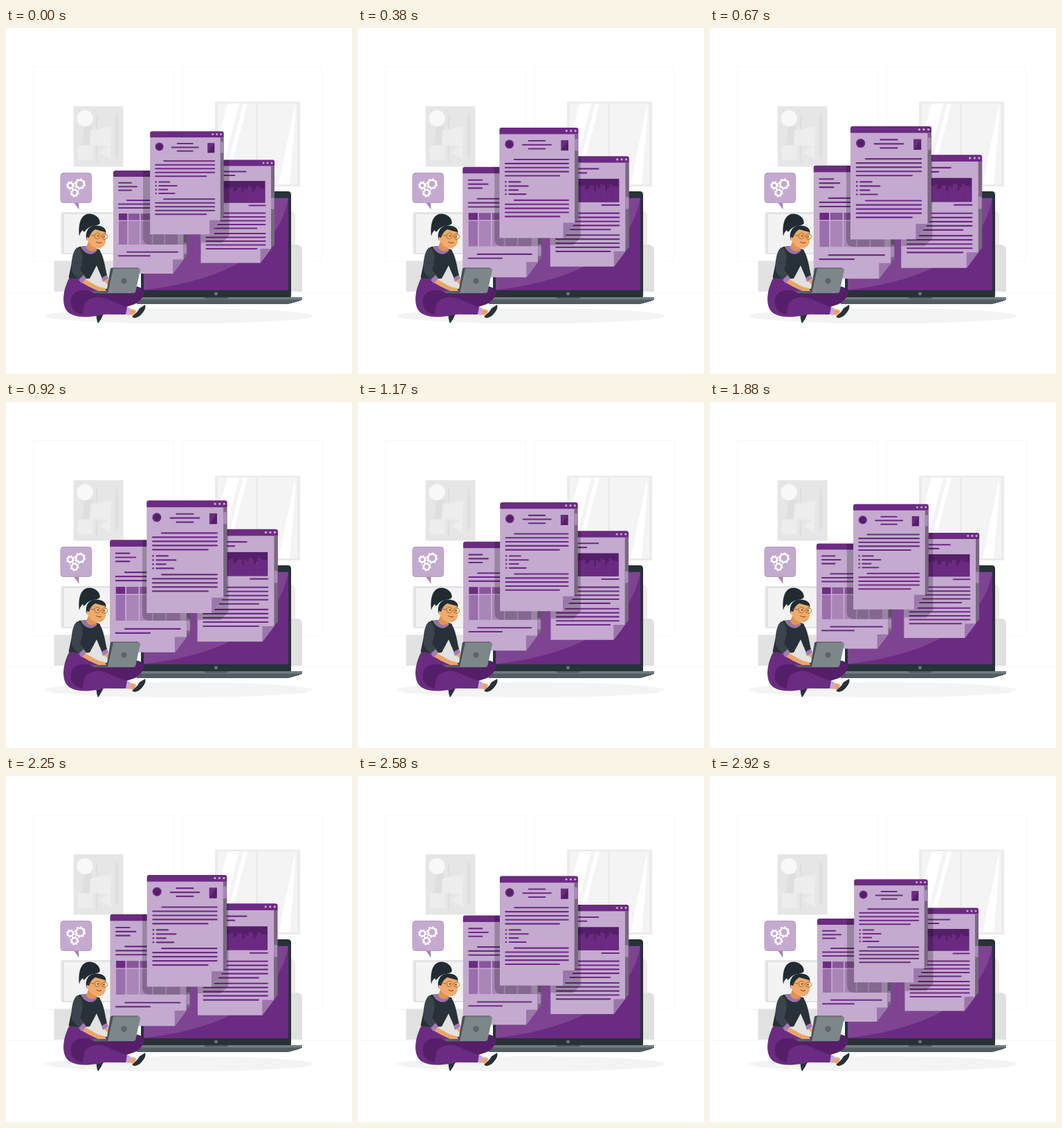
Write an HTML page that moves like this. It is 500 px wide and 500 px high and loops after 3 s.

```html
<!DOCTYPE html>
<html lang="en">
<head>
<meta charset="utf-8">
<title>Documents</title>
<style>
html, body { margin: 0; width: 100%; height: 100%; overflow: hidden; background: #fff; }
svg { display: block; width: 100vw; height: 100vh; }
</style>
</head>
<body>
<svg viewBox="0 0 500 500">
  <defs>
    <clipPath id="sheet"><path d="M0 3Q0 0 3 0H103.500Q106.500 0 106.500 3V123L101.500 128.500L86 149H0Z"/></clipPath>
    <clipPath id="pane"><path d="M306 109H421V226H306Z"/></clipPath>
  </defs>

  <!-- room -->
  <path d="M39.500 55.500H242.500V337.500H39.500ZM255.500 55.500H458V337.500H255.500ZM0 382.500H500" fill="none" stroke="#f8f8f8"/>
  <path d="M97.500 113H169.500V200.500H97.500Z" fill="#e6e6e6"/>
  <path d="M113 141H125L121 169H110ZM130 125H132.500V194H130ZM158 125H162V186H158Z" fill="#dfdfdf"/>
  <path d="M122 148L153 141.500L151 171L121 169ZM104 170H126V191H104ZM135 179L150 169L152 190Z" fill="#ededed"/>
  <circle cx="114" cy="130.500" r="11.700" fill="#f8f8f8"/>
  <path d="M302 106.500H425V229H302Z" fill="#ebebeb"/>
  <path d="M306 109H421V226H306Z" fill="#f4f4f4"/>
  <g clip-path="url(#pane)" fill="#fff">
    <path d="M320 109H337L307 226H290ZM343 109H349L319 226H313ZM418 109V128L410 226H394Z"/>
    <path d="M361 109H364V226H361Z" fill="#ebebeb"/>
  </g>
  <rect x="79.500" y="266" width="90" height="61" rx="3" fill="#e3e3e3"/>
  <rect x="84" y="269" width="85" height="56" rx="2" fill="#f3f3f3"/>
  <path d="M69.500 336.500H180V381H69.500Z" fill="#e2e2e2"/>
  <rect x="360" y="264" width="58" height="90" rx="7" fill="#ebebeb"/>
  <path d="M390 313H420Q428 313 428 322V381H390Z" fill="#e0e0e0"/>
  <ellipse cx="249.500" cy="416" rx="193.500" ry="11" fill="#f4f4f4"/>

  <!-- large laptop -->
  <rect x="195" y="236" width="217" height="156" rx="4.500" fill="#263238"/>
  <rect x="199" y="245.500" width="209" height="133.500" rx="1.500" fill="#6c2b82"/>
  <path d="M199 246H408Q388 354 205 378H199Z" fill="#7e4492"/>
  <circle cx="303.500" cy="384" r="2.500" fill="#66727a"/>
  <path d="M180 389H428V393H180Z" fill="#727d82"/>
  <path d="M180 392.500H428Q427 394 408 399H190Z" fill="#515d63"/>
  <path d="M286 389H321.500L319 391.500H288Z" fill="#525c61"/>

  <g id="docs"></g>

  <!-- speech bubble -->
  <path d="M97 251L105.500 262.500L105 251Z" fill="#a487b1"/>
  <rect x="79" y="209.500" width="44.500" height="43" rx="4" fill="#c4aacf" stroke="#b79bc3"/>
  <g id="gears" fill="none" stroke="#fff"></g>

  <!-- legs -->
  <path d="M143 404L154 407L149 412L139 410Z" fill="#eca465"/>
  <path d="M130.500 408Q137 410 143 406Q140 418 133 427Q130 421 130.500 408Z" fill="#263238"/>
  <path d="M130 378L180 374Q194 371 199 380Q202 389 186 399L165 406L110 400Z" fill="#541f68"/>
  <path d="M92 360C81 380 79 405 93 413C107 421 130 417 152 412L174 414L176 404C160 401 143 388 128 377L113 362Z" fill="#6c2b82"/>
  <path d="M94 400C92 384 102 376 122 380L150 384L160 400C146 398 132 396 117 400Q110 403 111 414Q97 412 94 400Z" fill="#541f68"/>
  <path d="M113 399C122 386 140 386 153 395L176 404L174 414Q140 414 124 413Q111 409 113 399Z" fill="#6c2b82"/>
  <path d="M175 403L180 405L178 415L173 414Z" fill="#c4aacf"/>
  <path d="M180 406L188 408L186 416L178 414Z" fill="#eca465"/>
  <path d="M182 417Q190 411 193 405L201 400Q203 405 197 412Q192 419 185 419Z" fill="#263238"/>

  <!-- body -->
  <path d="M106 316C98 320 94 345 90.500 361Q105 364 121 362Q127 351 132 341L136 321L119 315Z" fill="#263238"/>
  <path d="M103 317C95 322 93 346 96 353Q101 361 109 365L114 358L107 349C112 337 113 321 103 317Z" fill="#3a464b"/>
  <path d="M133 319C141 326 143 345 146 357L139 362Q135 353 130 341Z" fill="#263238"/>
  <path d="M108 316Q119 313 132 321Q126 329 118 326Q111 323 108 316Z" fill="#9b70ad"/>
  <path d="M120 306L116 317Q121 326 130 321L132 314Z" fill="#e0924f"/>
  <path d="M111 361Q124 369 134 374L143 376L145 380H133Q119 374 108 367Z" fill="#eca465"/>
  <path d="M140 364L146 362L151 368L148 372Z" fill="#eca465"/>
  <path d="M112 357L116 362L109 369L105 364ZM138 361L146 357L148 362L140 367Z" fill="#a47ab5"/>

  <!-- head -->
  <path d="M106 301C104 286 107 269 120 268.500C130 268.500 137 276 135.500 283C130 287 124 285 119 289C114 292 113 298 111 292Q107 295 106 301Z" fill="#212c32"/>
  <path d="M116 305C114 291 122 285 131 285.500C140 286 146 290 144 298L120 307Z" fill="#212c32"/>
  <path d="M120 303Q123 294 129 291Q136 293 143.500 295L144 307C144 314 139 318.500 132 318.500C126 318 121 313 119 308Q115 306 117 302Z" fill="#f0aa69"/>
  <g fill="none" stroke="#8b622e" stroke-width=".8"><circle cx="132" cy="300.500" r="4.200"/><circle cx="142.500" cy="301.500" r="4"/><path d="M128 300L119 299"/></g>
  <circle cx="133" cy="300.500" r=".9" fill="#263238"/><circle cx="141.500" cy="301.500" r=".9" fill="#263238"/>
  <path d="M130.500 309Q134 312 138 310" fill="none" stroke="#7d3f24"/>

  <!-- small laptop -->
  <path d="M122 380H187Q186 383.500 183 383.500H127Z" fill="#566268"/>
  <path d="M151 347.500Q152 346.500 154 346.500H191L184 382.500H145Z" fill="#465157"/>
  <path d="M155 347.500H192Q194.500 347.500 194 350L187.500 380Q187 383 184 383H147Z" fill="#7d878a"/>
  <circle cx="170.500" cy="365.500" r="4.200" fill="#5c676b"/>
</svg>

<script>
const MAIN = '#6c2b82', DARK = '#541f68', PALE = '#c4aacf', LOOP = 3000, STEP = 5.5;
const el = id => document.getElementById(id);
const repeat = (n, f) => Array.from({ length: n }, (_, i) => f(i)).join('');
const box = (x, y, w, h, fill) => `<rect x="${x}" y="${y}" width="${w}" height="${h}" fill="${fill}"/>`;
const disc = (x, y, r, fill) => `<circle cx="${x}" cy="${y}" r="${r}" fill="${fill}"/>`;
const line = (y, x1, x2) =>
  `<path d="M${x1} ${y}H${x2}" stroke="${MAIN}" stroke-width="2" stroke-linecap="round"/>`;

// indented first line, short last line
const para = (y, n = 5, last = 81) =>
  repeat(n, i => line(y + i * STEP, i ? 8 : 20, i == n - 1 ? last : 93));

// short, long, short; align 0 is left, .5 is centred
const heading = (x, short, long, align) => repeat(3, i => {
  const w = i == 1 ? long : short, x1 = x - w * align;
  return line(17.8 + i * 5.4, x1, x1 + w);
});

const bullets = repeat(4, i => {
  const y = 73.3 + i * STEP;
  return disc(8.5, y, 1.2, MAIN) + line(y, 13, 28 - 1.5 * i + 12 * (i % 2));
});

const table = box(8, 62.2, 85, 9.3, '#89559b') + box(8, 62.2, 12.5, 9.3, MAIN) +
  box(8, 73, 85, 34, '#a985b8') + box(8, 73, 12.5, 34, '#9b6eac') +
  repeat(4, i => box(20.3 + i * 17.7, 62, 1.7, 46, PALE));

let seed = 7;
const random = () => (seed = seed * 16807 % 2147483647) / 2147483647;
const chart = box(8, 30.5, 85, 31.5, DARK) + repeat(28, i => {
  const h = 14 + 11 * random();
  return box(8 + i * 3, 62 - h, 3.1, h, MAIN);
});

const seal = disc(13.4, 22.4, 6, MAIN) + disc(13.4, 22.4, 4.3, DARK) +
  box(83, 17, 10, 14, MAIN) + `<path d="M93 17V31H83Z" fill="${DARK}"/>`;

const shade = d => `<path clip-path="url(#sheet)" d="${d}" opacity=".22"/>`;

const sheet = (x, y, thumb, body, shadow = '') => ({ x, y, art: `
  <path d="M100 9H106.500V122.500L101 128.500H100Z" fill="#786880"/>
  <path d="M0 9H101.500V128.500L86 149H0Z" fill="${PALE}"/>
  <path d="M0 9V3Q0 0 3 0H103.500Q106.500 0 106.500 3V9Z" fill="${MAIN}"/>
  ${repeat(3, i => disc(90.5 + 6 * i, 4.4, 1.5, PALE))}
  <rect x="101.500" y="${thumb}" width="4.500" height="16.500" rx="2" fill="#a88bb5"/>
  ${body}<path d="M86 128.500H101.500L86 149Z" fill="#9b76ab"/>${shadow}` });

const sheets = [
  sheet(155, 206, 104, heading(8, 18, 26, 0) + para(43, 3) + table + para(117.8, 2, 53),
    shade('M43 0H107V107H53Q43 107 43 97Z')),
  sheet(281.5, 190.5, 55, line(17, 30, 65) + line(22.5, 8, 49) + chart + line(66, 70, 93) +
    para(77) + para(106.5), shade('M0 0H41V110L31 120H0Z')),
  sheet(208.2, 149.2, 15, seal + heading(50.5, 22, 38, .5) + para(43) + bullets + para(98))
];
el('docs').innerHTML = sheets.map(s => `<g>${s.art}</g>`).join('');
const groups = [...el('docs').children];

function gear(x, y, r) {
  const rim = r + 1.4, tooth = 2 * Math.PI * rim / 16;
  return `<circle cx="${x}" cy="${y}" r="${r}" stroke-width="2.500"/>
    <circle cx="${x}" cy="${y}" r="${rim}" stroke-width="2" stroke-dasharray="${tooth}"/>`;
}
el('gears').innerHTML = gear(93, 227.5, 3.8) + gear(107, 225.5, 5.8) + gear(99, 238, 4.2);

const sineOut = u => Math.sin(u * Math.PI / 2);
const sineInOut = u => (1 - Math.cos(u * Math.PI)) / 2;

// two swells; the first one sets off at once
function pulse(t) {
  const move = (t0, t1, a, b, ease) => a + (b - a) * ease((t - t0) / (t1 - t0));
  if (t < 760) return move(0, 760, 0, 1, sineOut);
  if (t < 1650) return move(760, 1650, 1, 0, sineInOut);
  if (t < 2360) return move(1650, 2360, 0, .9, sineInOut);
  return t < 2940 ? move(2360, 2940, .9, 0, sineInOut) : 0;
}

function draw(t) {
  const scale = 1 + .1 * pulse(t % LOOP);
  sheets.forEach(({ x, y }, i) => groups[i].setAttribute('transform',
    `translate(${x + 53.25} ${y + 74.5}) scale(${scale}) translate(-53.250 -74.500)`));
}
const start = performance.now();
function tick() {
  draw(performance.now() - start);
  requestAnimationFrame(tick);
}
tick();
</script>
</body>
</html>
```
